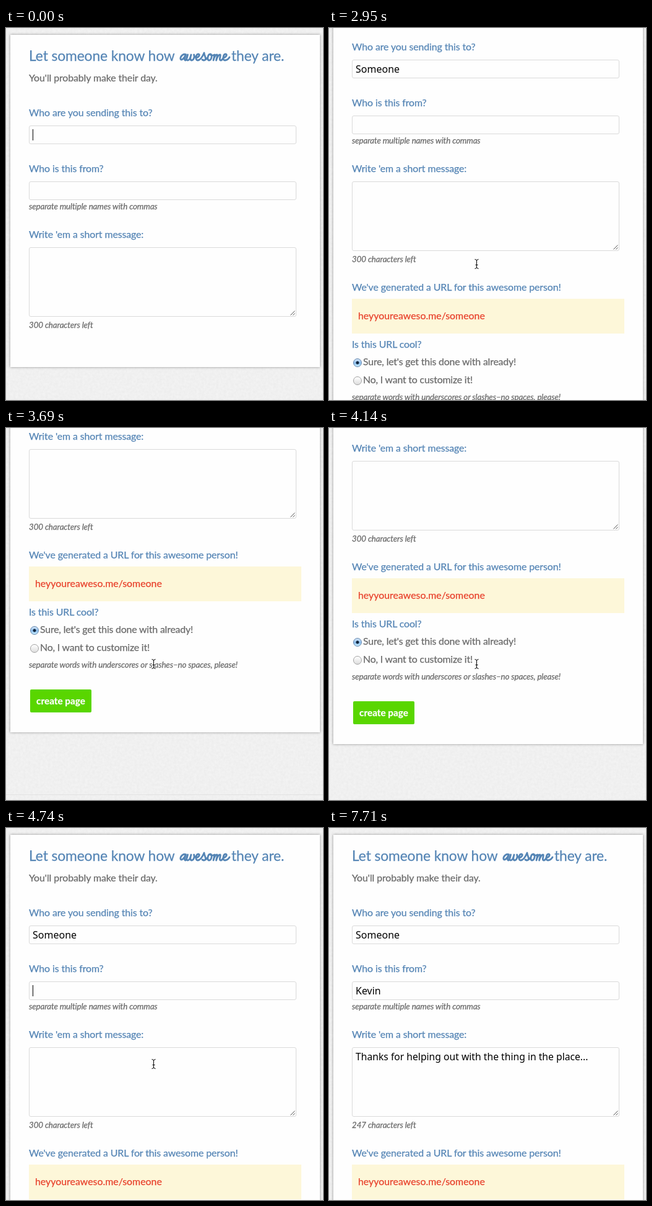
An HTML page for the animation above (8000 ms loop, 512 px wide and 599 px high).

```html
<!DOCTYPE html>
<html lang="en">
<head>
<meta charset="utf-8">
<title>Kind note form</title>
<style>
html, body { margin: 0; width: 100%; height: 100%; overflow: hidden; background: #f0f0f0; }
#stage { position: relative; width: 512px; height: 599px; overflow: hidden;
  font: 15.9px/20px Lato, "Open Sans", sans-serif; letter-spacing: -.1px; color: #6a6a6a;
  -webkit-text-stroke: .25px; }
#page { position: absolute; left: 0; top: 0; width: 512px; height: 918px; }
#page *, .pointer { position: absolute; box-sizing: border-box; white-space: pre; }
#paper { left: 0; top: 0; }
#card { left: 7px; top: 11px; width: 500px; background: #fefefe; box-shadow: 0 0 4px rgba(0, 0, 0, .42); }
#rule { left: 0; width: 512px; height: 1px; background: #e2e2e2; }
.row { left: 37px; }
.label, .title { color: #5585b5; }
.title { font-size: 22.8px; }
.hint { font-size: 13.4px; font-style: italic; letter-spacing: -.13px; }
.field { left: 37px; width: 432px; height: 30px; border: 1px solid #dadada; border-radius: 3px; background: #fefefe;
  color: #000; font: 16px/20px "Noto Sans", "Open Sans", sans-serif; letter-spacing: 0; -webkit-text-stroke: 0; }
.field span { left: 5px; top: 4px; height: 20px; }
.area { height: 112px; font-size: 15.7px; }
.area svg { right: 1px; bottom: 1px; }
.caret::after { content: ""; position: absolute; left: 100%; top: 1px; width: 1px; height: 18px; background: #000; }
#extra { left: 0; top: 514px; width: 512px; overflow: hidden; }
#url { left: 37px; top: 28px; width: 440px; height: 56px; padding: 17px 10px; background: #fdf7d9; color: #e8402b;
  letter-spacing: 0; }
.option { left: 55px; letter-spacing: -.2px; }
.radio { left: 39px; width: 14px; height: 14px; border: 1px solid #a2a2a2; border-radius: 50%;
  background: linear-gradient(#fff, #dedede); }
.radio.on { border-color: #6486ad; background: radial-gradient(circle at 50% 50%, #10253d 0 2px, transparent 3px),
  linear-gradient(#d5e6f7, #8dbfee 55%, #c9eeff); }
#create { left: 39px; top: 226px; width: 99px; height: 37px; border-radius: 2px; background: #59d600;
  color: #fff; font-weight: 700; font-size: 15.3px; line-height: 37px; letter-spacing: 0; text-align: center; }
.pointer { left: 230px; top: 370px; }
</style>
</head>
<body>
<div id="stage">
  <div id="page">
    <svg id="paper" width="512" height="918">
      <filter id="grain" x="0" y="0" width="100%" height="100%" color-interpolation-filters="sRGB">
        <feTurbulence type="fractalNoise" baseFrequency=".25" numOctaves="2" seed="4"/>
        <feColorMatrix values="0 0 0 .04 .921  0 0 0 .04 .921  0 0 0 .04 .921  0 0 0 0 1"/>
      </filter>
      <rect width="512" height="918" filter="url(#grain)"/>
    </svg>
    <div id="rule"></div>
    <div id="card"></div>

    <div class="row title" style="top:34px">Let someone know how</div>
    <svg style="left:276px;top:32px" width="92" height="28" role="img" aria-label="awesome"
      fill="none" stroke="#5585b5" stroke-width="2.8" stroke-linecap="round" stroke-linejoin="round">
      <path transform="translate(5 20)" d="M9-9C5-12 0-5 1-2C2 1 7-3 9.500-9.500C7-3 7 0 9 0Q11-1 12.500-9
        C10-3 10 0 12.500 0C15 0 17-5 18-9C16-3 16.500 0 19 0C22 0 24-6 22.500-9Q23-6 26-4
        C31-5 33-10 29.500-10C26-10 24 0 28.500 0C32 0 36-5 39-12C39-7 43-4 41-1Q39 1 36-1M41-1Q43-2 45-5
        M49-10C45-10 43 0 47 0C51 0 53-10 49-10Q50-6 56-9L54 0C55-5 58-10 60-9C61-8 59-3 58.500 0
        C60-5 63-10 65-9C66.500-8 62 0 66 0Q68 0 70-4C75-5 77-10 73.500-10C70-10 68 0 72.500 0Q77 0 80-5"/>
    </svg>
    <div class="title" style="left:364px;top:34px">they are.</div>
    <div class="row" style="top:70px">You'll probably make their day.</div>

    <div class="row label" style="top:126px">Who are you sending this to?</div>
    <div class="field" style="top:157px"><span id="to"></span></div>

    <div class="row label" style="top:216px">Who is this from?</div>
    <div class="field" style="top:247px"><span id="from"></span></div>
    <div class="row hint" style="top:277px">separate multiple names with commas</div>

    <div class="row label" style="top:322px">Write 'em a short message:</div>
    <div class="field area" style="top:353px"><span id="message"></span>
      <svg width="8" height="8" stroke="#555"><path d="M.5 7.500l7-7M4.500 7.500l3-3"/></svg>
    </div>
    <div class="row hint" id="left" style="top:468px"></div>

    <div id="extra">
      <div class="row label" style="top:-1px">We've generated a URL for this awesome person!</div>
      <div id="url">heyyoureaweso.me/someone</div>
      <div class="row label" style="top:91px">Is this URL cool?</div>
      <div class="radio on" style="top:124px"></div>
      <div class="option" style="top:119px">Sure, let's get this done with already!</div>
      <div class="radio" style="top:153px"></div>
      <div class="option" style="top:148px">No, I want to customize it!</div>
      <div class="row hint" style="top:176px">separate words with underscores or slashes–no spaces, please!</div>
      <div id="create">create page</div>
    </div>
  </div>

  <svg class="pointer" id="beam" width="18" height="22" fill="none">
    <path id="bar" d="M5.500 2.500Q8.500 2.500 8.500 5V15Q8.500 17.500 5.500 17.500M11.500 2.500Q8.500 2.500 8.500 5M8.500 15Q8.500 17.500 11.500 17.500M6.500 11.500H10.500"/>
    <use href="#bar" stroke="#fff" stroke-width="3"/>
    <use href="#bar" stroke="#000"/>
  </svg>
  <svg class="pointer" id="arrow" width="24" height="30">
    <path d="M7.500 8.500V23L11 19.800L13.500 25.500L16 24.400L13.600 18.800H18Z" stroke="#fff" fill="#000"/>
  </svg>
</div>
<script>
const LOOP = 8000;
const $ = id => document.getElementById(id);
const el = {};
for (const id of ['page', 'card', 'rule', 'extra', 'to', 'from', 'message', 'left', 'beam', 'arrow']) el[id] = $(id);

// Each track lists [start time, value]; a value holds until the next one.
const words = {
  to: 'Someone',
  from: 'Kevin',
  message: 'Thanks for helping out with the thing in the place...'
};
const typed = {
  to: [[0, 0], [890, 1], [1190, 2], [1340, 3], [1480, 5], [1630, 6], [1770, 7]],
  from: [[0, 0], [5630, 1], [5780, 3], [5920, 5]],
  message: [[0, 0], [7270, 28], [7410, 53]]
};
const caret = [[0, 'to'], [440, ''], [890, 'to'], [2060, 'from'], [2510, ''], [3100, 'from'], [3540, ''],
  [4440, 'from'], [4890, ''], [5330, 'from'], [6220, 'message'], [6820, ''], [7270, 'message'], [7710, '']];
const reveal = [[0, 0], [2060, 5], [2210, 116], [2360, 247], [2510, 263]];
const scroll = [[0, 0], [2950, 106], [3100, 190], [3240, 245], [3390, 285], [3540, 308], [3690, 319],
  [4140, 300], [4290, 230], [4440, 139], [4590, 40], [4740, 0]];
const pointer = [[0, ''], [2950, 'beam'], [4290, 'arrow'], [4590, 'beam'], [5030, '']];

function at(track, t) {
  let value = track[0][1];
  for (const [start, next] of track) if (t >= start) value = next;
  return value;
}

function setText(node, text) {
  if (node.textContent !== text) node.textContent = text;
}

function draw() {
  const t = performance.now() % LOOP;
  const focus = at(caret, t);
  for (const id in words) {
    setText(el[id], words[id].slice(0, at(typed[id], t)));
    el[id].classList.toggle('caret', id === focus);
  }
  setText(el.left, 300 - at(typed.message, t) + ' characters left');

  const open = at(reveal, t);
  el.extra.style.height = open + 'px';
  el.card.style.height = 535 + open + 'px';
  el.rule.style.top = 646 + open + 'px';
  el.page.style.transform = `translateY(${-at(scroll, t)}px)`;

  const shape = at(pointer, t);
  for (const id of ['beam', 'arrow']) el[id].style.display = id === shape ? 'block' : 'none';
  requestAnimationFrame(draw);
}
draw();
</script>
</body>
</html>
```
